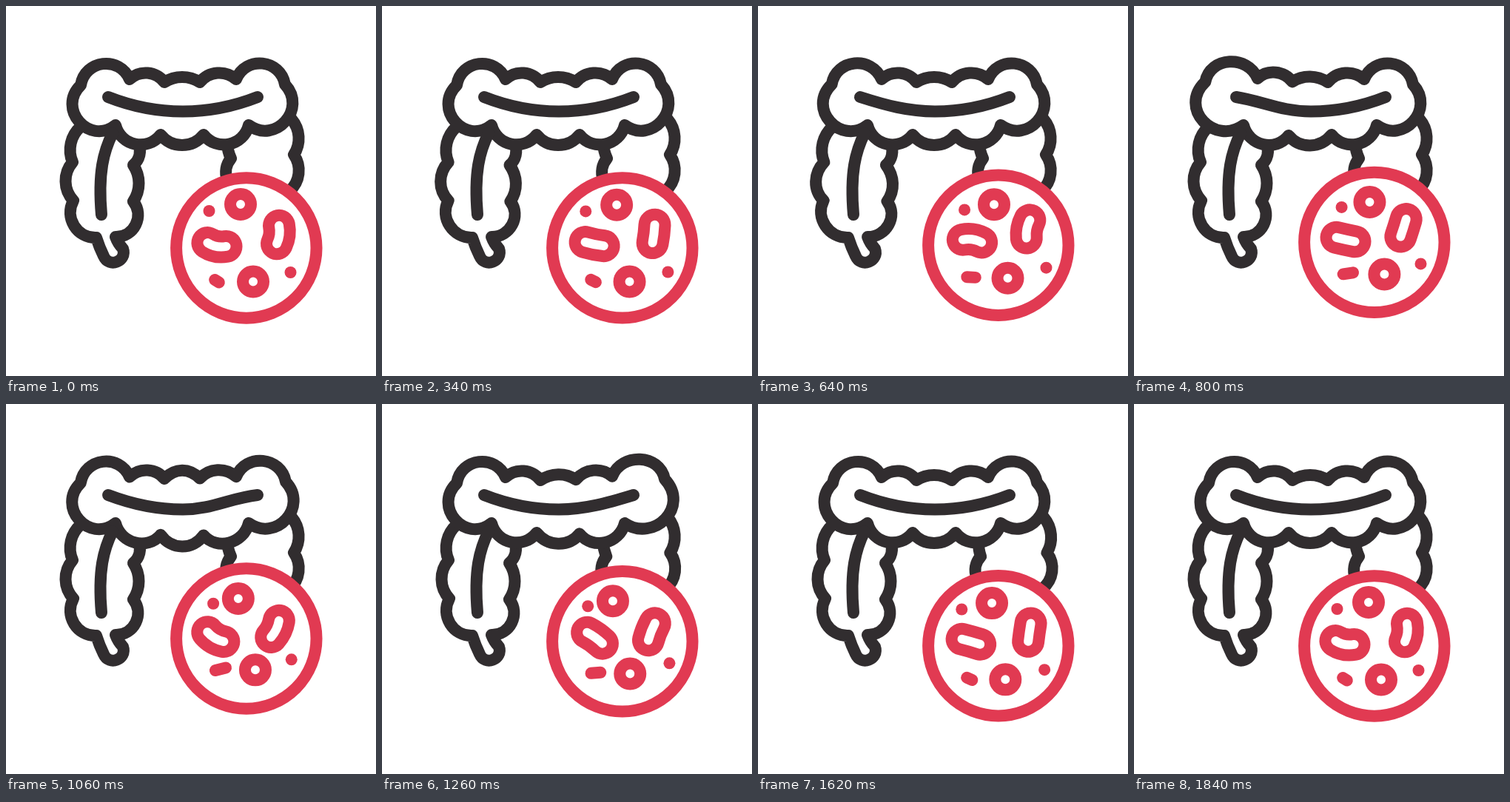
An HTML page for the animation above (2 s loop, 500 by 500 pixels).

```html
<!DOCTYPE html>
<html lang="en">
<head>
<meta charset="utf-8">
<title>Colon and microbes</title>
<style>
  html, body { margin: 0; width: 100%; height: 100%; overflow: hidden; background: #fff; }
  svg { display: block; width: 100vw; height: 100vh; }
  path, circle { fill: none; stroke-width: 16; stroke-linecap: round; stroke-linejoin: round; }
  .ink { stroke: #312d2f; }
  .red { stroke: #e13a52; }
  .solid { fill: #fff; }
  .dot { fill: #e13a52; }
  .shell { stroke-width: 44; }
  .core { stroke: #fff; stroke-width: 12; }
</style>
</head>
<body>
<svg id="stage" viewBox="0 0 500 500"></svg>
<script>
const LOOP = 2000, STEP = 20, REST = 160, MOVE = 1680;
const stage = document.getElementById('stage');

function add(tag, cls) {
  const el = document.createElementNS('http://www.w3.org/2000/svg', tag);
  el.setAttribute('class', cls);
  return stage.appendChild(el);
}
function set(el, attrs) {
  for (const k in attrs) el.setAttribute(k, attrs[k]);
}

// Smooth swell: 0 outside peak +- half, 1 at the peak
function swell(t, peak, half) {
  const d = Math.abs(t - peak) / half;
  return d >= 1 ? 0 : Math.cos(d * Math.PI / 2) ** 2;
}
const bell = (v, mid, width) => Math.exp(-(((v - mid) / width) ** 2));

// Each bowel section bulges as the wave passes through it
function leftWave(x, y, t) {
  const k = 6 * swell(t, 510, 270) * bell(y, 255, 38);
  return [x + (x - 130) / 49 * k, y];
}
function topWave(x, y, t) {
  const cx = Math.min(342, Math.max(134, x));
  const k = swell(t, 820 + 2.1 * (cx - 134), 280);
  const end = cx !== x;
  const lift = y > 140
    ? 6 * bell(x, 238, 40)
    : -(end ? 4.5 : 1.5 + 9 * bell(x, 238, 16)) * Math.min(1, (140 - y) / 30);
  return [x + (x - cx) / 42 * 6 * k, y + lift * k];
}
function rightWave(x, y, t) {
  const k = swell(t, 1500, 330) * bell(y, 222, 30);
  return [x + (x < 348 ? -5.5 : 3.5) * k, y];
}

// Chains of arcs: a start point, then [x, y, bulge to the left of travel]
const bowel = [
  { wave: leftWave, chain: [[179, 186], [172, 215, 5], [172, 264, 7.5], [148, 312, 17],
    [158, 328, -1], [132, 338, 13.5], [122, 313, 0.5],
    [91, 263, 17], [90, 211, 10], [101, 163, 8]] },
  { wave: rightWave, chain: [[386, 153], [389, 201, 8], [383, 250, 9.5]] },
  { wave: rightWave, chain: [[299, 186], [304, 206, -1], [299, 235, -4]] },
  { wave: topWave, solid: true, chain: [[101, 107], [167, 99, 25], [214, 103, 10.5],
    [262, 103, 7], [311, 99, 10.5], [377, 106, 25], [328, 161, 33.5],
    [267, 174, 19.5], [209, 174, 14], [148, 161, 19.5], [101, 107, 34]] }
];
for (const part of bowel) part.el = add('path', part.solid ? 'ink solid' : 'ink');
set(add('path', 'ink'), { d: 'M144,172 C132,196 124,225 129,282' });
const fold = add('path', 'ink');
const dish = add('circle', 'red solid');

// Joins the chain with near-circular cubics, every point moved by the wave
function arcs({ chain, wave }, t) {
  const at = (x, y) => wave(x, y, t).map(v => v.toFixed(2)).join();
  let [x, y] = chain[0], d = 'M' + at(x, y);
  for (const [ex, ey, bulge] of chain.slice(1)) {
    const dx = ex - x, dy = ey - y, chord = Math.hypot(dx, dy);
    const s = (1 - (2 * bulge / chord) ** 2) / 3, h = bulge * 4 / 3 / chord;
    const ctrl = u => at(x + dx * u + dy * h, y + dy * u - dx * h);
    d += ` C${ctrl(s)} ${ctrl(1 - s)} ${at(ex, ey)}`;
    [x, y] = [ex, ey];
  }
  return d;
}

// Microbes drift on a few shared rhythms
function rhythm(t) {
  const u = Math.min(1, Math.max(0, (t - REST) / MOVE)), a = 2 * Math.PI * u;
  const rise = (1 - Math.cos(a)) / 2;
  return { rise, bob: rise ** 2, sway: Math.sin(a) * rise, flex: Math.cos(2 * a) };
}

function round(cls, r, place) {
  const el = add('circle', cls);
  set(el, { r });
  return m => {
    const [cx, cy] = place(m);
    set(el, { cx, cy });
  };
}
// A bar by centre, half length, angle in degrees and bend
function bar(classes, place) {
  const els = classes.map(c => add('path', c));
  return m => {
    const [x, y, half, deg, bend] = place(m);
    const c = Math.cos(deg * Math.PI / 180), s = Math.sin(deg * Math.PI / 180);
    const d = `M${x - half * c},${y - half * s}
      Q${x - bend * s},${y + bend * c} ${x + half * c},${y + half * s}`;
    for (const el of els) set(el, { d });
  };
}
const rod = ['red shell', 'core'];
const microbes = [
  round('red', 14, m => [317 - 2 * m.rise + 5.4 * m.sway, 268 + 9 * m.rise - 14.3 * m.bob]),
  round('red', 14, m => [334 + 3.5 * m.rise + 2.3 * m.sway, 372.5 + 1.5 * m.rise - 15 * m.bob]),
  round('dot', 8, m => [274.5 + 6 * m.rise + 1.5 * m.sway, 277 + 5 * m.rise - 12.5 * m.bob]),
  round('dot', 8, m => [386.8 + m.rise - 2.3 * m.flex, 360 - 3 * m.rise - 12 * m.bob]),
  bar(['red'], m => [285 + 5 * m.rise, 371.7 - 13.8 * m.bob, 3.3 + 4 * m.rise, 32 - 47 * m.rise, 0]),
  bar(rod, m => [288 - 2 * m.rise - 3 * m.flex, 322.5 - 8 * m.rise, 12.8,
    11 + 15 * m.rise - 20 * m.sway, 5 * m.flex]),
  bar(rod, m => [367.5 - 4 * m.rise, 309 - 6.5 * m.rise - 6 * m.sway, 12.3,
    97 + 18 * m.bob - 5 * m.sway, -4 * m.flex])
];

function draw(t) {
  for (const part of bowel) set(part.el, { d: arcs(part, t) });

  const a = swell(t, 820, 280), b = swell(t, 1080, 280);
  set(fold, { d: `M138,123 C${171 + 4 * a},${136 - 7 * a} ${205 - 5 * a},142.5 239,142.5
    C${273 + 5 * b},142.5 ${307 - 4 * b},${136 - 9 * b} 340,123` });

  const m = rhythm(t);
  set(dish, { cx: 324.8, cy: 327 - 10.2 * m.bob, r: 94.7 });
  for (const move of microbes) move(m);
}

const start = performance.now();
function tick() {
  const t = (performance.now() - start) % LOOP;
  draw(Math.floor(t / STEP) * STEP);
  requestAnimationFrame(tick);
}
tick();
</script>
</body>
</html>
```
